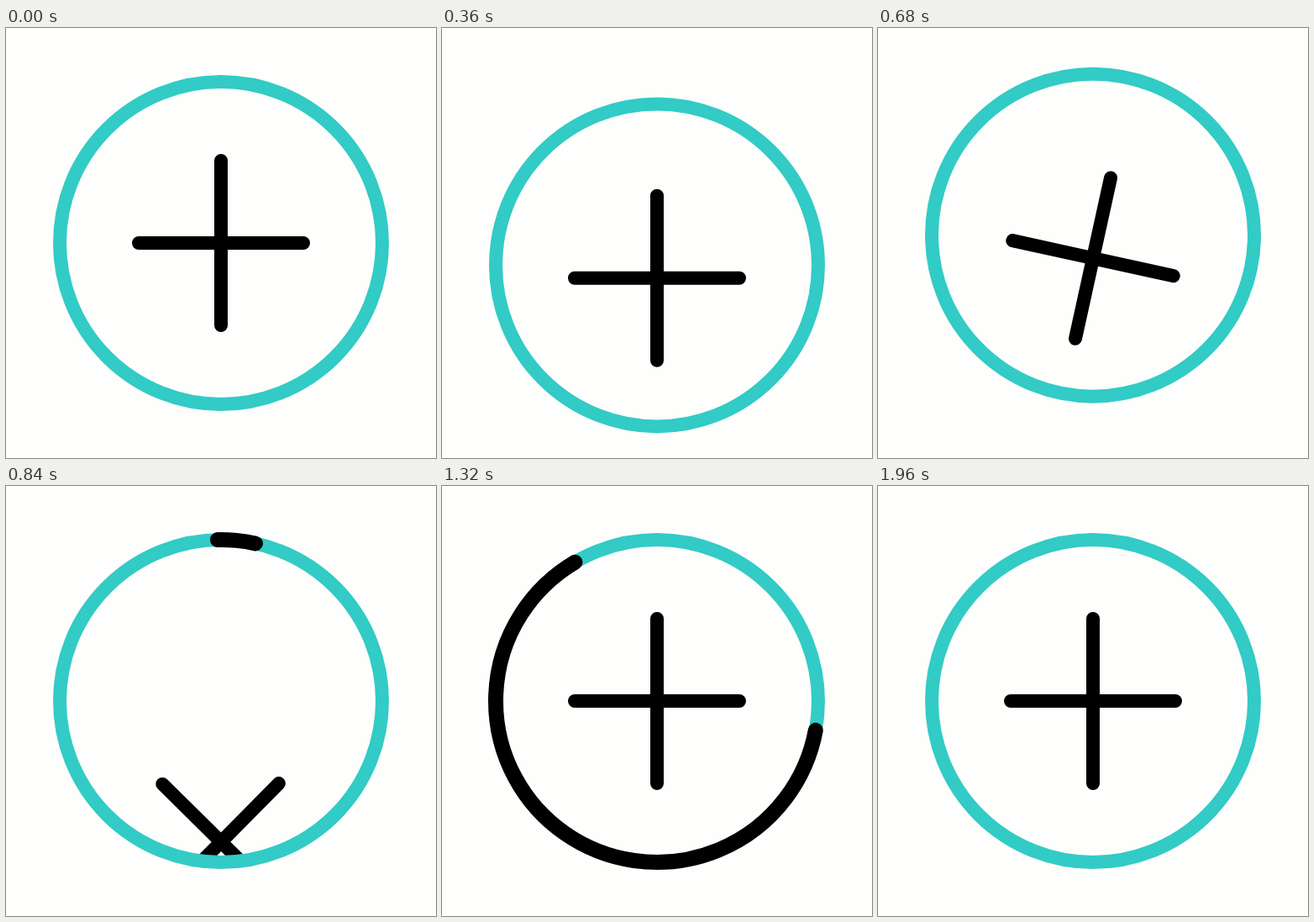
Animation of 512x512 px, one loop 2 s. Source, as an HTML page:

```html
<!DOCTYPE html>
<html lang="en">
<head>
<meta charset="utf-8">
<title>Plus in a circle</title>
<style>
  html, body { margin: 0; height: 100%; overflow: hidden; background: #fefefc; }
  svg { display: block; width: 100%; height: 100%; }
  path, circle { fill: none; stroke: #000; stroke-width: 16; stroke-linecap: round; }
  #track { stroke: #32cbc6; }
  #arc { stroke-width: 18; }
</style>
</head>
<body>
<svg viewBox="0 0 512 512">
  <clipPath id="inside"><circle r="192"/></clipPath>
  <g id="ring">
    <g clip-path="url(#inside)">
      <path id="leaving" d="M-98 0H98M0-98V98"/>
      <path id="entering" d="M-98 0H98M0-98V98"/>
    </g>
    <circle id="track" r="192"/>
    <path id="arc"/>
  </g>
</svg>
<script>
const LOOP = 2000, RADIUS = 192, ARC_START = -91.2;
const [ring, leaving, entering, arc] =
  ['ring', 'leaving', 'entering', 'arc'].map(id => document.getElementById(id));

const smooth = x => x * x * (3 - 2 * x);

// Eases between [time, value] keys and holds the first and last values.
function at(keys, t) {
  let [t0, v0] = keys[0];
  for (const [t1, v1] of keys) {
    if (t < t1) return t <= t0 ? v0 : v0 + (v1 - v0) * smooth((t - t0) / (t1 - t0));
    [t0, v0] = [t1, v1];
  }
  return v0;
}

const ringY = [[0, 0], [340, 27.9], [540, -20.8], [804, 0]];
const leavingY = [[0, 0], [340, 44.3], [540, -39.3], [1145, 378]];
const leavingTurn = [[540, 0], [1145, 90]];
const enteringY = [[640, -378], [1240, 0]];
const enteringTurn = [[640, 90], [1240, 0]];
const arcHead = [[762, 0], [1440, 360]];
const arcTail = [[987, 0], [1940, 360]];

function point(deg) {
  const a = deg * Math.PI / 180;
  return `${RADIUS * Math.cos(a)} ${RADIUS * Math.sin(a)}`;
}

function arcPath(from, to) {
  if (to - from < 0.1) return '';
  const mid = (from + to) / 2, half = `A${RADIUS} ${RADIUS} 0 0 1 `;
  return 'M' + point(from) + half + point(mid) + half + point(to);
}

function place(node, y, turn) {
  node.setAttribute('transform', `translate(0 ${y}) rotate(${turn})`);
}

function draw(t) {
  const y = at(ringY, t);
  ring.setAttribute('transform', `translate(256 ${256 + y})`);
  place(leaving, at(leavingY, t) - y, at(leavingTurn, t));
  place(entering, at(enteringY, t) - y, at(enteringTurn, t));
  arc.setAttribute('d', arcPath(ARC_START + at(arcTail, t), ARC_START + at(arcHead, t)));
}

const begin = performance.now();
function tick() {
  draw((performance.now() - begin) % LOOP);
  requestAnimationFrame(tick);
}
tick();
</script>
</body>
</html>
```
